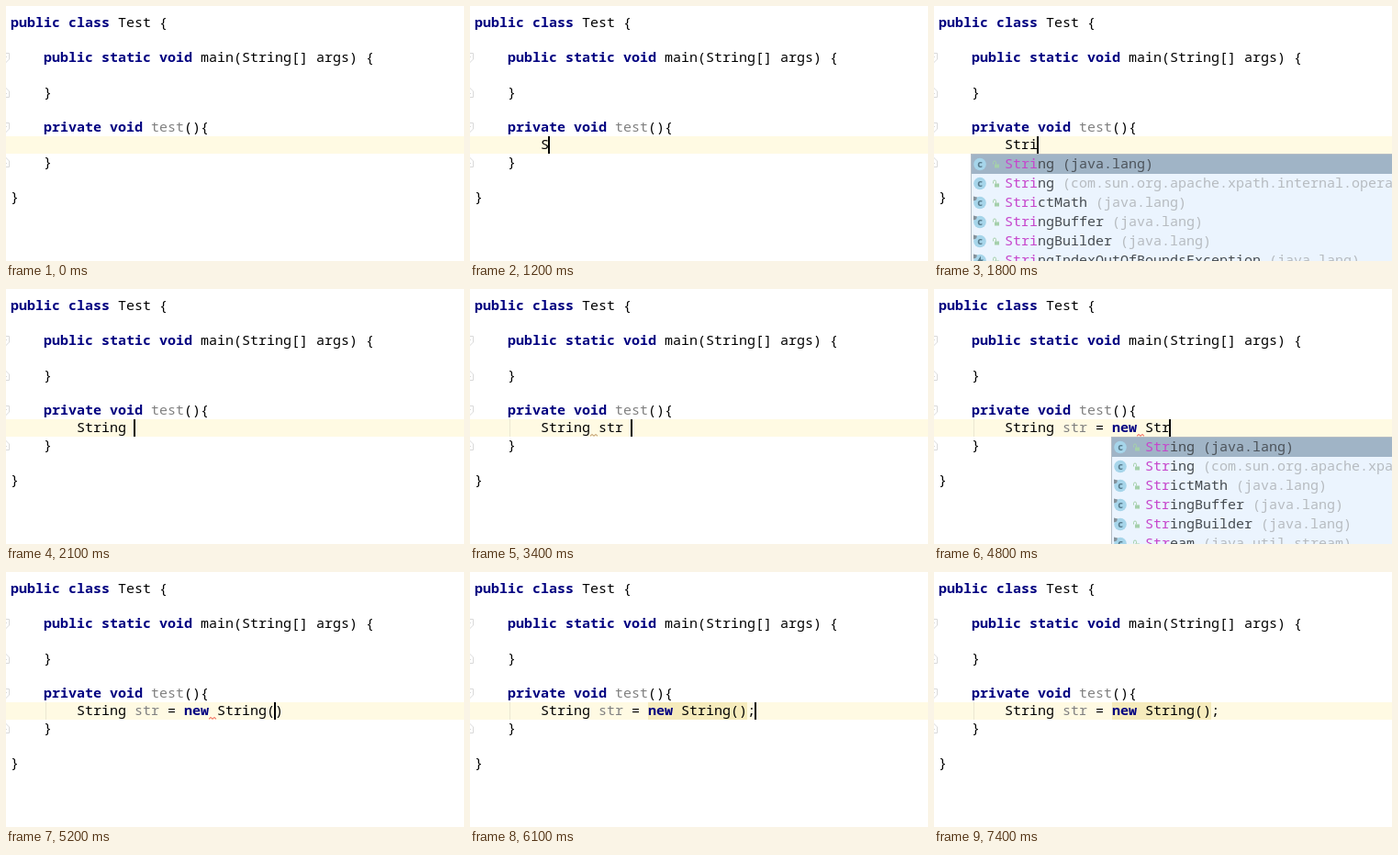
Write an HTML page that moves like this. It is 499 by 278 pixels and loops after 7500 ms.

```html
<!DOCTYPE html>
<html>
<head>
<meta charset="utf-8">
<style>
  html, body { margin: 0; width: 100%; height: 100%; overflow: hidden; background: #fff; }
  svg { display: block; }
  text { font: 15px "Noto Sans Mono", "DejaVu Sans Mono", monospace; white-space: pre; }
  .keyword { font-weight: bold; fill: #000080; }
  .unused { fill: #808080; }
  .hint { font: 11px "Open Sans", sans-serif; fill: #777; }
  .letter { font: bold 11px "Open Sans", sans-serif; fill: #56798a; text-anchor: middle; }
</style>
</head>
<body>
<svg id="stage" width="499" height="278" viewBox="0 0 499 278"></svg>
<script>
const LOOP = 7500, CELL = 9, LEFT = 4, LINE = 19, EDIT_ROW = 7, EDIT_COL = 8, ITEM = 21;
const rowTop = row => 9 + row * LINE;
const colX = col => LEFT + col * CELL;
const editTop = rowTop(EDIT_ROW), popupTop = editTop + LINE;

const rect = (x, y, w, h, fill) =>
  `<rect x="${x}" y="${y}" width="${w}" height="${h}" fill="${fill}"/>`;
const label = (x, y, content, attrs = '') => `<text x="${x}" y="${y}" ${attrs}>${content}</text>`;

const JAVA = '(java.lang)';
const STRINGS = [['String', JAVA], ['String', '(com.sun.org.apache.xpath.internal.operations)']];
const BUILDERS = [['StringBuffer', JAVA], ['StringBuilder', JAVA]];
const MATH = ['StrictMath', JAVA];
const lists = {
  S: [...STRINGS, ['StackOverflowError', JAVA], ['System', JAVA], ['Short', JAVA], ['Set', '(java.util)']],
  St: [...STRINGS, ['StackOverflowError', JAVA], ['StackTraceElement', JAVA], MATH, BUILDERS[0]],
  Str: [...STRINGS, MATH, ...BUILDERS, ['Stream', '(java.util.stream)']],
  Stri: [...STRINGS, MATH, ...BUILDERS, ['StringIndexOutOfBoundsException', JAVA]],
  created: [...STRINGS, ...BUILDERS],
  variable: [['string', '']],
  keyword: [['new', '']]
};

const classPopup = (list, prefix, col = 8, hint = false) =>
  ({ items: lists[list], prefix, col, hint, pad: 36, icons: true });
const namePopup = prefix => ({ items: lists.variable, prefix, col: 15, hint: true, pad: 9 });
const newPopup = prefix => ({ items: lists.keyword, prefix, col: 21, hint: true, pad: 36 });

// Each entry changes the editor state from its time on.
const timeline = [
  [0, { code: '', caret: 0, popup: null, error: null, errorColor: '#b58a55', guide: false, unused: false, marked: false }],
  [600, { caret: 8 }],
  [1200, { code: 'S', caret: 9 }],
  [1300, { popup: classPopup('S', 'S') }],
  [1500, { code: 'St', caret: 10, popup: classPopup('St', 'St') }],
  [1600, { code: 'Str', caret: 11, popup: classPopup('Str', 'Str') }],
  [1800, { code: 'Stri', caret: 12, popup: classPopup('Stri', 'Stri') }],
  [1900, { code: 'Strin', caret: 13, popup: classPopup('Stri', 'Stri') }],
  [2000, { code: 'String', caret: 14, popup: null }],
  [2100, { code: 'String ', caret: 15 }],
  [2200, { guide: true, error: 14 }],
  [3000, { code: 'String s', caret: 16 }],
  [3100, { popup: namePopup('s') }],
  [3200, { code: 'String st', caret: 17, popup: namePopup('st') }],
  [3300, { code: 'String str', caret: 18, popup: namePopup('str') }],
  [3400, { code: 'String str ', caret: 19, popup: null }],
  [3600, { code: 'String str =', caret: 20, unused: true, error: null, errorColor: '#f04838' }],
  [3700, { code: 'String str = ', caret: 21, error: 21 }],
  [3900, { code: 'String str = n', caret: 22, error: 22, popup: newPopup('n') }],
  [4000, { code: 'String str = new', caret: 24, error: 24, popup: newPopup('new') }],
  [4100, { code: 'String str = new ', caret: 25, popup: null }],
  [4300, { code: 'String str = new S', caret: 26 }],
  [4400, { popup: classPopup('S', 'S', 25) }],
  [4700, { code: 'String str = new St', caret: 27, popup: classPopup('St', 'St', 25) }],
  [4800, { code: 'String str = new Str', caret: 28, popup: classPopup('Str', 'Str', 25) }],
  [4900, { code: 'String str = new Stri', caret: 29, popup: classPopup('created', 'Stri', 25, true) }],
  [5200, { code: 'String str = new String()', caret: 32, popup: null }],
  [5400, { marked: true, error: null }],
  [5500, { error: 33 }],
  [5900, { code: 'String str = new String();', caret: 34, error: 34 }],
  [6100, { error: null }],
  [6600, { caret: 0 }],
  [7100, { caret: 34 }],
  [7400, { caret: 0 }]
];

// Glyphs sit one pixel right of the cell edge where the caret stands.
const textX = col => colX(col) + 1;

function codeLine(code, row, col, unused) {
  return code.split(/\b(public|class|static|void|private|new|test|str)\b/).map(part => {
    const x = textX(col);
    col += part.length;
    const grey = part === 'test' || (part === 'str' && unused);
    const kind = grey ? 'unused' : /^(public|class|static|void|private|new)$/.test(part) ? 'keyword' : '';
    return part.trim() ? label(x, rowTop(row) + 14, part, `class="${kind}"`) : '';
  }).join('');
}

function foldMark(row, flip) {
  const y = rowTop(row) + 9.5;
  return `<g transform="translate(0 ${y}) scale(1 ${flip})" fill="none" stroke="#d9d9d9">
    <path d="M-4 -5H3.5V1.5L-.5 5.5M-2 -1H1"/></g>`;
}

function squiggle(col, color) {
  const x = colX(col) + 1;
  const points = [0, 2, 4, 6, 8].map((dx, i) => `${x + dx},${i % 2 ? 158.5 : 160.3}`).join(' ');
  return `<polyline points="${points}" fill="none" stroke="${color}"/>`;
}

function classIcon(x, y, name, pinned) {
  const mark = name.endsWith('Exception') || name.endsWith('Error')
    ? `<path d="M${x + 1} ${y - 5}l-4 6h3l-1 4 5 -6h-3z" fill="#56798a"/>`
    : label(x, y + 3.5, 'c', 'class="letter"');
  const pin = pinned ? `<path d="M${x - 7} ${y - 7}l4 1 -1 3 -3 1z" fill="#84929b"/>` : '';
  return `<circle cx="${x}" cy="${y}" r="6.8" fill="#a6d5ea"/>${mark}${pin}
    <path d="M${x + 14.5} ${y}v-2a1.5 1.5 0 0 1 3 0v2" fill="none" stroke="#a5d0ab"/>
    ${rect(x + 16, y, 5, 4, '#a5d0ab')}`;
}

function drawPopup({ items, prefix, col, hint, pad, icons }) {
  const left = colX(col) - pad, top = popupTop + 1;
  const listHeight = items.length * ITEM;
  const height = listHeight + (hint ? 16 : 0);
  let out = rect(left, popupTop, 499 - left, height + 1, '#b4bcc4')
    + rect(left + 1, top, 499 - left, height - (hint ? 1 : 0), '#ebf4fe')
    + rect(left + 1, top, 499 - left, ITEM, '#a0b4c6');
  items.forEach(([name, place], i) => {
    const y = top + i * ITEM;
    if (icons) out += classIcon(left + 10, y + 10.5, name, i > 1);
    out += label(textX(col), y + 15, `<tspan fill="#c646cc">${prefix}</tspan>${name.slice(prefix.length)} `
      + `<tspan fill="${i ? '#b6bbc0' : '#4c535a'}">${place}</tspan>`, 'fill="#454b50"');
  });
  if (hint) {
    out += rect(left + 1, top + listHeight, 499 - left, 15, '#f2f2f2')
      + label(left + 5, top + listHeight + 12,
        'Dot, space and some other keys will also close this lookup and be inserted into editor', 'class="hint"');
  }
  return out;
}

const surroundings = [
  ['public class Test {', 0, 0], ['public static void main(String[] args) {', 2, 4], ['}', 4, 4],
  ['private void test(){', 6, 4], ['}', 8, 4], ['}', 10, 0]
].map(line => codeLine(...line)).join('')
  + foldMark(2, 1) + foldMark(4, -1) + foldMark(6, 1) + foldMark(8, -1);

function draw(s) {
  return rect(0, 0, 499, 278, '#fff')
    + rect(0, editTop, 499, LINE, '#fffae3')
    + (s.guide ? rect(43, editTop, 1, LINE, '#ebe7d2') : '')
    + (s.marked ? rect(194, editTop, 108, LINE, '#f6ebbc') : '')
    + surroundings
    + codeLine(s.code, EDIT_ROW, EDIT_COL, s.unused)
    + (s.error ? squiggle(s.error, s.errorColor) : '')
    + (s.caret ? rect(colX(s.caret), editTop, 2, LINE, '#000') : '')
    + (s.popup ? drawPopup(s.popup) : '');
}

const stage = document.getElementById('stage');
let shown = 0;

function frame() {
  const time = performance.now() % LOOP;
  const past = timeline.filter(([start]) => start <= time);
  if (past.length !== shown) {
    shown = past.length;
    stage.innerHTML = draw(Object.assign({}, ...past.map(([, change]) => change)));
  }
  requestAnimationFrame(frame);
}
frame();
</script>
</body>
</html>
```
